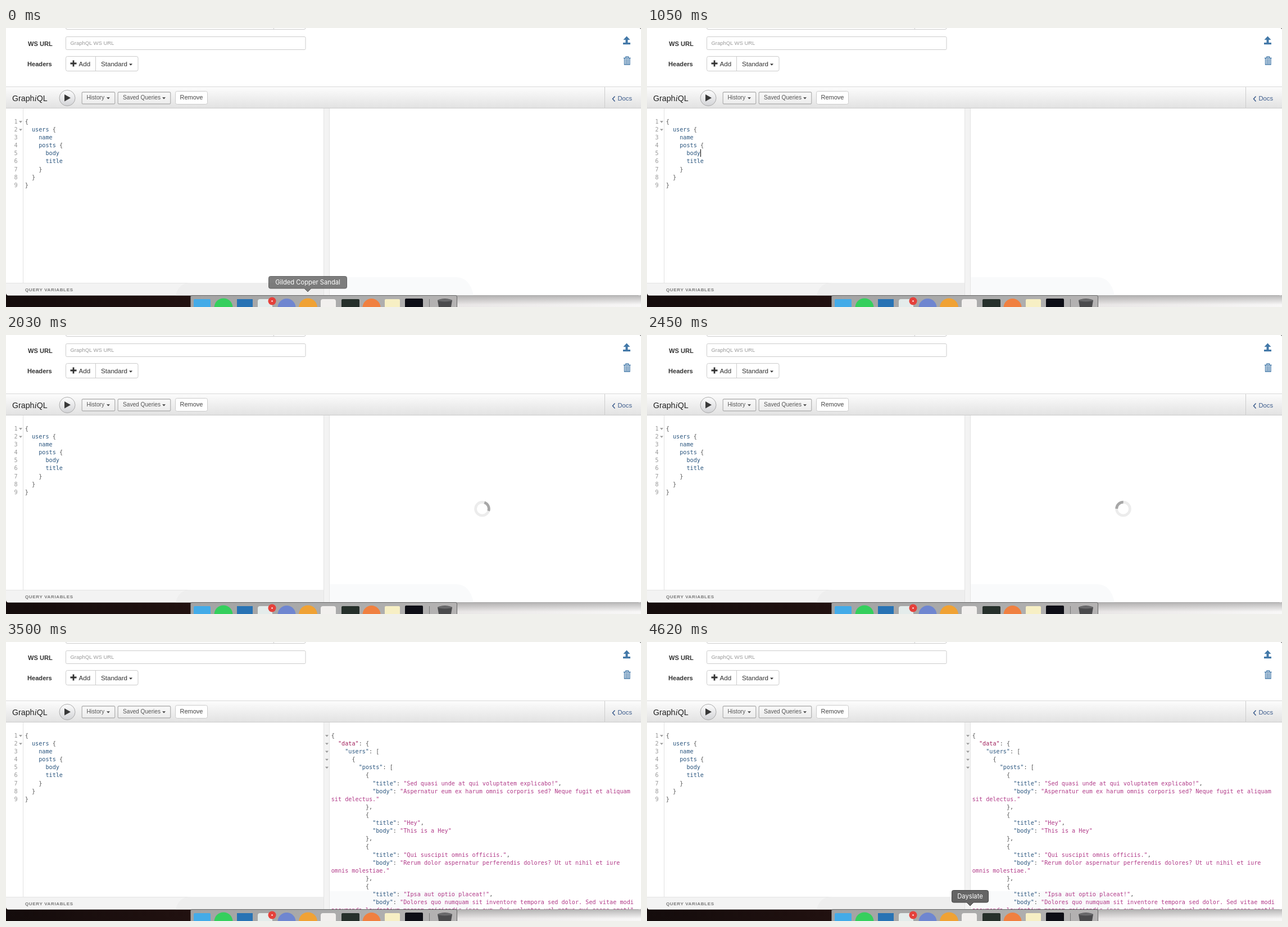
Animation, 1130 px wide and 496 px high, one loop 4.69 s. Source, as an HTML page:

```html
<!DOCTYPE html>
<html lang="en">
<head>
<meta charset="utf-8">
<title>GraphiQL query</title>
<style>
html, body { margin: 0; width: 100%; height: 100%; overflow: hidden; background: #fff; }
svg { display: block; width: 1130px; height: 496px; font-family: "Liberation Sans", Arial, sans-serif; }
.mono { font: 10.17px "DejaVu Sans Mono", monospace; }
.label { font-size: 11.1px; font-weight: bold; fill: #333; }
.box { fill: #fff; stroke: #ccc; }
.btn { fill: url(#btn); stroke: #b4b4b4; stroke-width: 1.3; }
.btnText { font-size: 10.15px; fill: #555; }
.line { stroke: #d8d8d8; fill: none; }
.prop { fill: #2b567f; }
.punct { fill: #555; }
.def { fill: #a0205c; }
.str { fill: #b13a88; }
.num { fill: #999; text-anchor: end; }
.icon { fill: #4278a8; }
#tip text { font: 11.2px Inter, sans-serif; fill: #fff; text-anchor: middle; }
</style>
</head>
<body>
<svg viewBox="0 0 1130 496">
  <defs>
    <linearGradient id="bar" x2="0" y2="1"><stop stop-color="#fcfcfc"/><stop offset="1" stop-color="#e2e2e2"/></linearGradient>
    <linearGradient id="btn" x2="0" y2="1"><stop stop-color="#f9f9f9"/><stop offset="1" stop-color="#ececec"/></linearGradient>
    <linearGradient id="play" x2="0" y2="1"><stop stop-color="#fdfdfd"/><stop offset="1" stop-color="#d2d3d6"/></linearGradient>
    <linearGradient id="dark"><stop stop-color="#140c0c"/><stop offset="1" stop-color="#2c1513"/></linearGradient>
    <linearGradient id="light"><stop stop-color="#e0dcdc"/><stop offset="1" stop-color="#f8f7f7"/></linearGradient>
    <linearGradient id="shade" x2="0" y2="1"><stop stop-color="#555" stop-opacity=".4"/><stop offset="1" stop-color="#555" stop-opacity="0"/></linearGradient>
    <linearGradient id="dockFill"><stop stop-color="#a3a3a3"/><stop offset=".6" stop-color="#acacac"/><stop offset="1" stop-color="#b5b3b3"/></linearGradient>
    <clipPath id="window"><path d="M0 0H1130V470Q1130 475.500 1125 475.500H5Q0 475.500 0 470Z"/></clipPath>
  </defs>

  <!-- desktop -->
  <rect y="468" width="600" height="28" fill="url(#dark)"/>
  <rect x="600" y="468" width="530" height="28" fill="url(#light)"/>
  <rect x="600" y="475" width="530" height="17" fill="url(#shade)"/>

  <g clip-path="url(#window)">
    <rect width="1130" height="476" fill="#fff"/>

    <!-- connection form -->
    <path class="line" style="stroke:#ccc" d="M106.500 0Q106.500 2.500 109 2.500H530Q533 2.500 533 0M476.500 0V2.500"/>
    <text class="label" x="39" y="32">WS URL</text>
    <rect class="box" x="106.500" y="15.500" width="426.500" height="23" rx="2"/>
    <text x="114.500" y="30" font-size="9.450" fill="#999">GraphQL WS URL</text>
    <text class="label" x="38" y="67.500">Headers</text>
    <rect class="box" x="106.500" y="50.500" width="128.500" height="26" rx="3"/>
    <path class="line" style="stroke:#ccc" d="M159.500 50.500V76.500"/>
    <path d="M120 57.500V68.500M114.500 63H125.500" stroke="#333" stroke-width="2.800"/>
    <g font-size="11.600" fill="#333"><text x="129.500" y="67.500">Add</text><text x="169" y="67.500">Standard</text></g>
    <path d="M219 63.500h6l-3 3.200z" fill="#333"/>
    <path class="icon" d="M1104.500 14.500l6 6.500h-4v5h-4v-5h-4zM1098 26h13v3.300h-13z"/>
    <g fill="none" stroke="#4278a8" stroke-width="1.300">
      <path d="M1099 53.500H1111.500M1103 53V50.800H1107.500V53M1100.500 54V65H1110V54M1103 55V64M1105.300 55V64M1107.600 55V64"/>
    </g>

    <!-- toolbar -->
    <rect y="105" width="1130" height="37.500" fill="url(#bar)"/>
    <path class="line" d="M0 104.500H1130"/>
    <path class="line" style="stroke:#ccc" d="M0 142.500H1130M1065.500 105V142"/>
    <text x="11" y="129.500" font-size="14.200" fill="#222">Graph<tspan font-family="Liberation Serif, serif" font-style="italic" font-size="15.500">i</tspan>QL</text>
    <circle cx="109" cy="124.500" r="14" fill="url(#play)" stroke="#aaa"/>
    <path d="M104 118L115 124.300L104 130.500Z" fill="#383838"/>
    <rect class="btn" x="135.200" y="114" width="58.500" height="21" rx="2"/>
    <rect class="btn" x="199.200" y="114" width="93.500" height="21" rx="2"/>
    <rect class="box" x="301.500" y="112.500" width="57" height="23" rx="3"/>
    <text class="btnText" x="143.500" y="127.200">History</text>
    <text class="btnText" x="208" y="127.200">Saved Queries</text>
    <path d="M179 123.300h6l-3 3.200zM278 123.300h6l-3 3.200z" fill="#444"/>
    <text x="309.500" y="127.300" font-size="11" fill="#444">Remove</text>
    <path d="M1083.500 121.500L1079.500 126L1083.500 130.500" fill="none" stroke="#3b5b8c" stroke-width="1.500"/>
    <text x="1088.500" y="129" font-size="11.200" fill="#3b5b8c">Docs</text>

    <!-- panes -->
    <path class="line" style="stroke:#e2e2e2" d="M30.500 143V453"/>
    <rect x="565" y="143" width="11" height="333" fill="#f3f3f3"/>
    <path class="line" style="stroke:#e4e4e4" d="M565.500 143V476M575.500 143V476"/>
    <rect y="453" width="565" height="23" fill="#f3f3f3"/>
    <path class="line" style="stroke:#e4e4e4" d="M0 453.500H565"/>
    <path d="M302 476Q306 453 330 453H565V476Z" fill="#eee"/>
    <path d="M576 443H800Q826 443 832 476H576Z" fill="#f9fafb"/>
    <text x="34" y="467.700" font-size="8" font-weight="bold" letter-spacing=".65" fill="#777">QUERY VARIABLES</text>
    <g id="query" class="mono"></g>
    <path id="caret" d="M95.500 215.500V229" stroke="#000"/>
    <g id="result" class="mono"></g>
    <g id="folds" fill="#999"></g>
    <g id="spinner" fill="none" stroke="#969696" stroke-width="4.700">
      <circle cx="847.500" cy="309" r="11.900" opacity=".18"/>
      <circle id="arc" cx="847.500" cy="309" r="11.900" opacity=".8" pathLength="4" stroke-dasharray="1 3"/>
    </g>
  </g>
  <path d="M1127 0h3v3q0-3-3-3z" fill="#333"/>
  <path d="M4 475.500H1126" stroke="#888" stroke-opacity=".6"/>

  <!-- dock -->
  <path d="M328.500 496V478Q328.500 475.500 331 475.500H800Q802.500 475.500 802.500 478V496" fill="url(#dockFill)" stroke="#666"/>
  <rect x="334" y="482" width="30" height="20" rx="2" fill="#43abe8"/>
  <circle cx="387" cy="497" r="16.500" fill="#35cf5d"/>
  <rect x="411" y="482" width="28" height="20" fill="#2873b4"/>
  <rect x="448" y="482" width="26" height="20" rx="4" fill="#e4eceb"/>
  <circle cx="473.500" cy="485.500" r="7" fill="#e5413b"/>
  <circle cx="473.500" cy="485.500" r="1.200" fill="#fff"/>
  <circle cx="499.500" cy="497" r="16" fill="#6f86d0"/>
  <circle cx="537.500" cy="497" r="16.500" fill="#f0a234"/>
  <rect x="560" y="482" width="27" height="20" rx="4" fill="#f2f0ee"/>
  <rect x="597" y="482" width="32" height="20" rx="2" fill="#26302b"/>
  <circle cx="650.500" cy="497" r="16" fill="#f08040"/>
  <rect x="674" y="482" width="27" height="20" rx="2" fill="#f7efc4"/>
  <rect x="710" y="481" width="32" height="20" rx="2" fill="#0d0e16"/>
  <path d="M753.500 482V496" stroke="#777"/>
  <path d="M768 484Q781 478 794 484L792 496H770Z" fill="#4b4b4d"/>
  <ellipse cx="781" cy="484" rx="12.500" ry="2.500" fill="#6a6a6c"/>

  <g id="tip">
    <path id="bubble" fill="#606060" fill-opacity=".97" stroke="#444"/>
    <text id="tipText" y="456.200"></text>
  </g>
</svg>
<script>
const LOOP = 4690, CHAR = 6.12, ROW = 14.12;
const $ = id => document.getElementById(id);

const query = ['{', '  users {', '    name', '    posts {', '      body', '      title', '    }', '  }', '}'];
const result = `{
  "data": {
    "users": [
      {
        "posts": [
          {
            "title": "Sed quasi unde at qui voluptatem explicabo!",
            "body": "Aspernatur eum ex harum omnis corporis sed? Neque fugit et aliquam
sit delectus."
          },
          {
            "title": "Hey",
            "body": "This is a Hey"
          },
          {
            "title": "Qui suscipit omnis officiis.",
            "body": "Rerum dolor aspernatur perferendis dolores? Ut ut nihil et iure
omnis molestiae."
          },
          {
            "title": "Ipsa aut optio placeat!",
            "body": "Dolores quo numquam sit inventore tempora sed dolor. Sed vitae modi
assumenda laudantium magnam reiciendis ipsa eum. Qui voluptas vel natus qui saepe amet!"`.split('\n');

const baseline = row => 169.8 + row * ROW;
const text = (x, row, cls, str) => `<text x="${x}" y="${baseline(row)}" class="${cls}">${str}</text>`;
const fold = (x, row) => `<path d="M${x - 3} ${165.3 + row * ROW}h6l-3 3.4z"/>`;

// Colour each token and place it by its column.
function code(lines, x, rule) {
  return lines.map((line, row) => [...line.matchAll(rule)].map(m => {
    const s = m[0];
    const cls = s === '"data"' ? 'def'
      : /^\w+$/.test(s) || /^"(users|posts|title|body)"$/.test(s) ? 'prop'
      : /\w/.test(s) ? 'str' : 'punct';
    return text(x + m.index * CHAR, row, cls, s);
  }).join('')).join('');
}

$('query').innerHTML = code(query, 33.7, /\w+|[{}]/g)
  + query.map((_, i) => text(20.5, i, 'num', i + 1)).join('')
  + `<g fill="#999">${fold(26, 0)}${fold(26, 1)}</g>`;
$('result').innerHTML = code(result, 578.7, /"[^"]*"?|^\w[^"]*"|[{}[\]:,]+/g);
$('folds').innerHTML = [0, 1, 2, 3, 4].map(i => fold(571, i)).join('');

// from, to, centre, half width, name
const tips = [
  [0, 140, 537, 70, 'Gilded Copper Sandal'],
  [3990, 4340, 612.5, 24.5, 'oPlum'],
  [4340, LOOP, 575, 33, 'Dayslate']
];

const show = (id, on) => $(id).style.display = on ? '' : 'none';

function draw(t) {
  show('caret', t >= 1010 && t < 1540);
  show('spinner', t >= 1925 && t < 2590);
  $('arc').setAttribute('transform', `rotate(${(t - 1925) * 0.6 - 135} 847.5 309)`);
  show('result', t >= 2590);
  show('folds', t >= 3190);

  const tip = tips.find(([from, to]) => t >= from && t < to);
  show('tip', tip);
  if (!tip) return;
  const [from, , x, w, name] = tip;
  $('bubble').setAttribute('d', `M${x - w + 3.5} 441.5H${x + w - 3.5}q3 0 3 3V460q0 3 -3 3H${x + 6}l-6 6l-6 -6H${x - w + 3.5}q-3 0 -3 -3V444.500q0 -3 3 -3z`);
  $('tipText').setAttribute('x', x);
  $('tipText').textContent = name;
  $('tip').style.opacity = from ? 1 : 0.84 * (1 - t / 140);
}

const start = performance.now();
function tick() {
  draw((performance.now() - start) % LOOP);
  requestAnimationFrame(tick);
}
tick();
</script>
</body>
</html>
```
